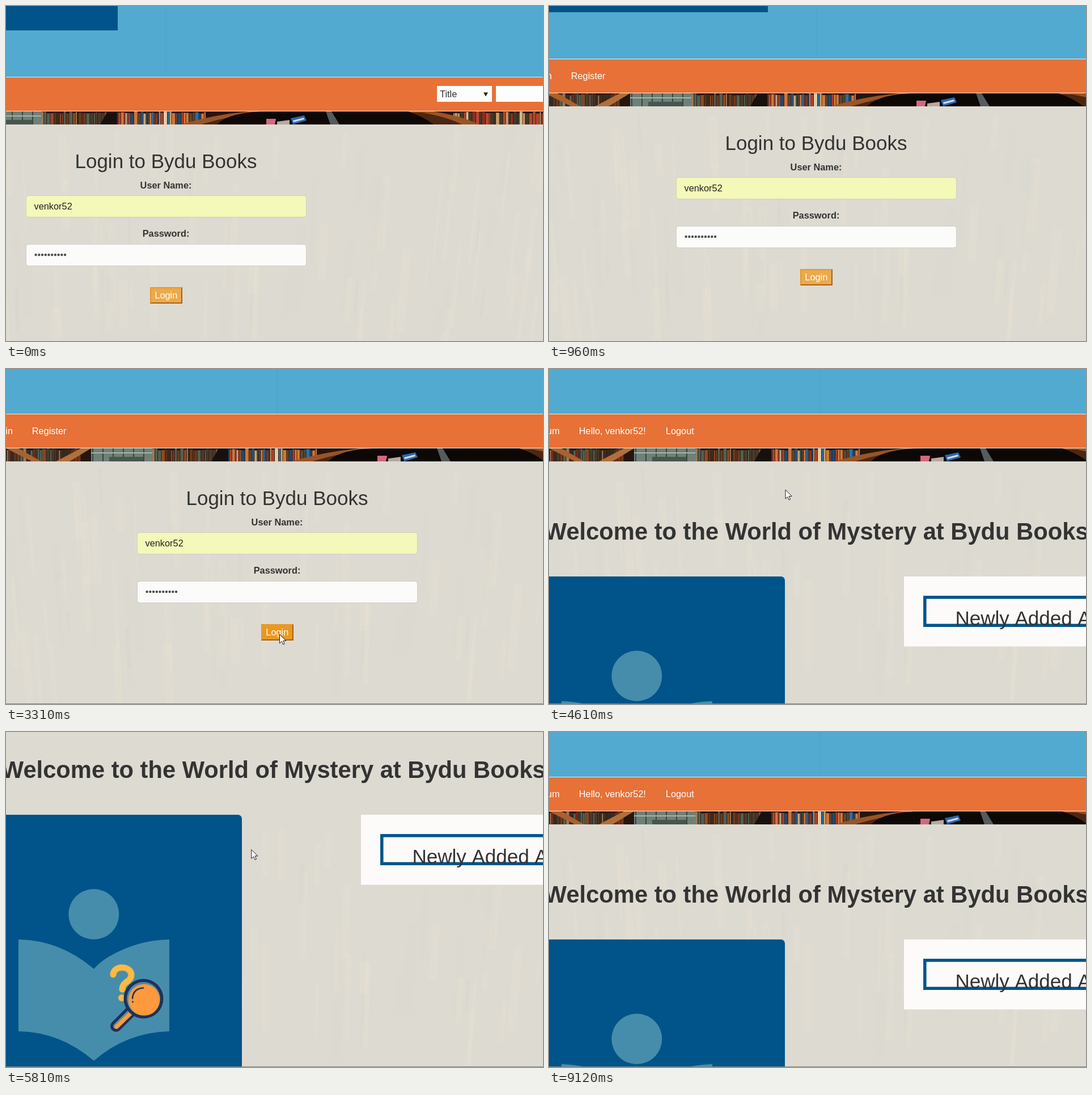
An HTML page with a canvas that plays this animation: 947x591 px, repeating every 9.74 s.

```html
<!DOCTYPE html>
<html lang="en">
<head>
<meta charset="utf-8">
<title>Bookshop login</title>
<style>
html, body { margin: 0; width: 100%; height: 100%; overflow: hidden; }
canvas { display: block; }
</style>
</head>
<body>
<canvas id="stage" width="947" height="591"></canvas>
<script>
const c = document.getElementById('stage').getContext('2d');
const LOOP = 9740, STEP = 120, WORLD = 1150;
const FONT = '"Liberation Sans", Arial, sans-serif';
const NAVY = '#005489', TEAL = '#468dac', INK = '#333', GLASS = '#1f3158';
const USER = 'venkor52', SHOP = 'Bydu Books';

// The picture holds still between runs of updates: [start, count].
const runs = [[0, 13], [1810, 1], [2060, 6], [2810, 4], [3310, 1], [3450, 2], [3720, 2],
  [4490, 2], [4910, 2], [5160, 1], [5310, 3], [5810, 2], [6070, 1], [6220, 1], [6470, 3],
  [6850, 1], [6990, 7], [8870, 1], [9120, 1]];
const ticks = runs.flatMap(([start, n]) => Array.from({ length: n }, (_, i) => start + i * STEP));

const panY = [[0, 46], [480, 27], [1440, 0]];
const scroll = [[4610, 0], [4910, 150], [5030, 348], [5160, 400], [5550, 400],
  [5810, 220], [5930, 19], [6070, 0]];
const pointer = [[0, 330, -60], [360, 385, -32], [480, 404, -7], [600, 420, -26], [1440, 436, -26],
  [1810, 436, -17], [2180, 470, 130], [2420, 550, 380], [2660, 608, 547], [2810, 600, 570],
  [2930, 565, 560], [3170, 481, 485], [3310, 482, 468], [3840, 482, 468], [4490, 430, 300],
  [4610, 416.5, 213], [5030, 414, 214], [5160, 421, 223], [5550, 433, 208], [5930, 432, 207],
  [6070, 431.5, 207], [6220, 424, 206], [6710, 837, 313], [6850, 870, 398], [7110, 838, 90],
  [7230, 860, 27], [7470, 915, 330], [7590, 931, 553], [7710, 960, 600], [8750, 960, 600],
  [8870, 940, 586], [9120, 960, 600]];

function track(points, t) {
  const i = points.findIndex(p => p[0] > t);
  if (i === 0) return points[0].slice(1);
  if (i < 0) return points[points.length - 1].slice(1);
  const a = points[i - 1], b = points[i], k = (t - a[0]) / (b[0] - a[0]);
  return a.slice(1).map((v, j) => v + (b[j + 1] - v) * k);
}

let seed = 1;
const random = () => (seed = seed * 16807 % 2147483647) / 2147483647;

function rect(x, y, w, h, color) {
  c.fillStyle = color;
  c.fillRect(x, y, w, h);
}
function round(x, y, w, h, r, fill, line) {
  c.beginPath();
  c.roundRect(x, y, w, h, r);
  c.fillStyle = fill;
  c.fill();
  if (line) { c.strokeStyle = line; c.lineWidth = 1; c.stroke(); }
}
function disc(x, y, r, color) {
  c.beginPath();
  c.arc(x, y, r, 0, 7);
  c.fillStyle = color;
  c.fill();
}
function shape(path, color) {
  c.fillStyle = color;
  c.fill(new Path2D(path));
}
function line(path, color, width) {
  c.strokeStyle = color;
  c.lineWidth = width;
  c.lineCap = 'round';
  c.stroke(new Path2D(path));
}
function text(s, x, y, size = 16.35, color = INK, align = 'left', weight = 'normal') {
  c.font = `${weight} ${size}px ${FONT}`;
  c.textAlign = align;
  c.fillStyle = color;
  c.fillText(s, x, y);
}

// Faint book spines fanning out over the page.
function wallpaper() {
  rect(0, -50, WORLD, 700, '#dddad1');
  seed = 41;
  for (let i = 0; i < 110; i++) {
    const x = random() * WORLD, y = 165 + random() * 330, h = 50 + random() * 110;
    const lean = (x - 450) * 0.0002 * h, w = 3 + random() * 13;
    shape(`M${x} ${y}h${w}l${-lean} ${h}h${-w}z`,
      i % 3 ? 'rgba(230,226,208,.3)' : 'rgba(210,207,202,.2)');
  }
}

function books(from, to, colors) {
  for (let x = from; x < to;) {
    const w = 2 + random() * 5, top = 140 + random() * 4;
    rect(x, top, w, 163 - top, colors[Math.floor(random() * colors.length)]);
    rect(x + w - 1, 140, 1, 23, '#2b1a12');
    x += w;
  }
}

// Strip of the library picture below the menu.
function shelves() {
  const brown = ['#6b3a1e', '#8f4a24', '#4a3a2a', '#9a7a52', '#3c2a20', '#7d2f22', '#536052'];
  const bright = ['#2f6ea3', '#c9a46a', '#e0cda6', '#b5402c', '#1f4a6f', '#d0763a', '#5c4630'];
  c.save();
  c.beginPath();
  c.rect(0, 140, WORLD, 23);
  c.clip();
  rect(0, 140, WORLD, 23, '#24160f');
  seed = 7;
  books(0, 130, brown);
  books(258, 392, brown);
  books(390, 548, bright);
  books(985, WORLD, ['#b4472c', '#8d2f20', '#c89a63', '#3f3a2c', '#d9b98a']);
  shape('M0 140H22L62 163H46z', '#a9622f');
  shape('M88 163L132 140H150L112 163z', '#b0703a');
  rect(150, 140, 108, 23, '#6f8078');
  for (let x = 152; x < 258; x += 18) rect(x, 140, 2, 23, '#39453f');
  rect(150, 147, 108, 2, '#a9b5a7');
  rect(182, 155, 60, 8, '#46564f');
  shape('M375 140H392V163H362z', '#17100c');
  shape('M505 163Q560 146 625 140H950Q1000 148 1030 163z', '#9a5426');
  shape('M540 163Q585 149 640 142H930Q975 150 1000 163z', '#4b2712');
  shape('M568 163Q590 140 660 140H905Q930 148 950 163z', '#0d0705');
  shape('M655 153h17l-2 10h-15z', '#d5677f');
  shape('M674 158l22-3v8h-22z', '#b6a9a0');
  shape('M698 152l24-5 4 9-24 7z', '#2d67ad');
  shape('M702 156l19-5 1 3-19 5z', '#d4dce3');
  shape('M760 140h10l14 23h-16z', '#565b5e');
  c.restore();
}

function header(member) {
  rect(0, -60, WORLD, 139, '#53aad0');
  rect(-7, -403, 400, 400, NAVY);
  rect(478, -60, 1, 139, '#4ca3ca');
  rect(0, 79, WORLD, 61, '#f3ece4');
  rect(0, 80, WORLD, 59, '#e87137');
  if (member) {
    text('Forum', 18.8, 115, undefined, '#fff', 'right');
    text(`Hello, ${USER}!`, 52.8, 115, undefined, '#fff');
    text('Logout', 205.8, 115, undefined, '#fff');
  } else {
    text('Login', 12, 115, undefined, '#fff', 'right');
    text('Register', 45.7, 115, undefined, '#fff');
  }
  rect(956, 95, 97, 28, '#fdfdfd');
  text('Title', 961, 115);
  shape('M1038 106.500h8l-4 7z', '#222');
  rect(1060, 95, 90, 28, '#fdfdfd');
  shelves();
}

function loginPage(hover) {
  text(`Login to ${SHOP}`, 478, 240, 35, INK, 'center');
  text('User Name:', 478, 276, 16.35, INK, 'center', 'bold');
  round(231.5, 288.5, 494, 38, 4.5, '#f4f8b8', '#cfcfc0');
  text(USER, 245.5, 313, 16.35, '#222');
  text('Password:', 478, 361, 16.35, INK, 'center', 'bold');
  round(231.5, 374.5, 494, 38, 4.5, '#fbfbfa', '#cfcdc8');
  for (let i = 0; i < 10; i++) disc(248.6 + i * 5.72, 393, 2.2, '#505050');
  rect(450, 450, 57, 29, '#e3992f');
  shape('M507 450V479H450L452 477H505V452z', '#a1641d');
  rect(452, 452, 53, 25, hover ? '#ec971f' : '#eda94a');
  text('Login', 478.3, 470, 16.35, '#fff', 'center');
}

function reader() {
  disc(154.800, 541.5, 44.5, TEAL);
  c.save();
  c.translate(0, 348);
  shape('M22 238Q95 239 155 290Q165 278 182 268Q232 239 288 238V400Q212 402 155 452Q95 401 22 400z', TEAL);
  line('M189 300C190 283 220 284 221 300C221 313 205 312 205 326', '#fdb944', 11);
  disc(204, 341, 6, '#fdb944');
  line('M224 361L194 391', GLASS, 20);
  line('M224 361L194 391', TEAL, 10);
  line('M225 363L195 392', '#fe993d', 7.5);
  disc(242.5, 342.5, 35, GLASS);
  disc(242.5, 342.5, 29.5, TEAL);
  disc(243.5, 344.5, 27.8, '#fe993d');
  line('M223 342Q224 325 242 323.500', GLASS, 2.5);
  disc(223.5, 348, 1.5, GLASS);
  c.restore();
}

function homePage() {
  text(`Welcome to the World of Mystery at ${SHOP}`, -8.2, 301, 41.7, INK, 'left', 'bold');
  round(-120, 366, 536, 523, 7, NAVY);
  reader();
  rect(626, 366, 524, 123.500, '#fcfbf9');
  c.strokeStyle = NAVY;
  c.lineWidth = 5.5;
  c.strokeRect(662.8, 402.8, 460, 49.500);
  text('Newly Added Arrivals', 716.4, 452, 35);
}

function cursor(x, y) {
  c.save();
  c.translate(x + 0.5, y + 0.5);
  const arrow = 'M0 0V15.500L3.700 12L6.200 17.500L8.700 16.400L6.200 11H10.800z';
  shape(arrow, '#fff');
  line(arrow, '#1c1c2b', 1);
  c.restore();
}

function draw(t) {
  const member = t >= 3720;
  const panX = t < 1440 ? -196 * Math.exp(-t / 290) : 0;
  c.setTransform(1, 0, 0, 1, Math.round(panX), Math.round(track(panY, t)[0]));
  wallpaper();
  c.save();
  c.translate(0, -Math.round(track(scroll, t)[0]));
  header(member);
  if (member) homePage();
  else loginPage(t >= 3310);
  c.restore();
  rect(0, 590, WORLD, 1, '#85837f');
  c.setTransform(1, 0, 0, 1, 0, 0);
  cursor(...track(pointer, t));
}

let shown = -1;
const begin = performance.now();
function frame() {
  const now = (performance.now() - begin) % LOOP;
  const tick = ticks.filter(t => t <= now).pop();
  if (tick !== shown) draw(shown = tick);
  requestAnimationFrame(frame);
}
frame();
</script>
</body>
</html>
```
